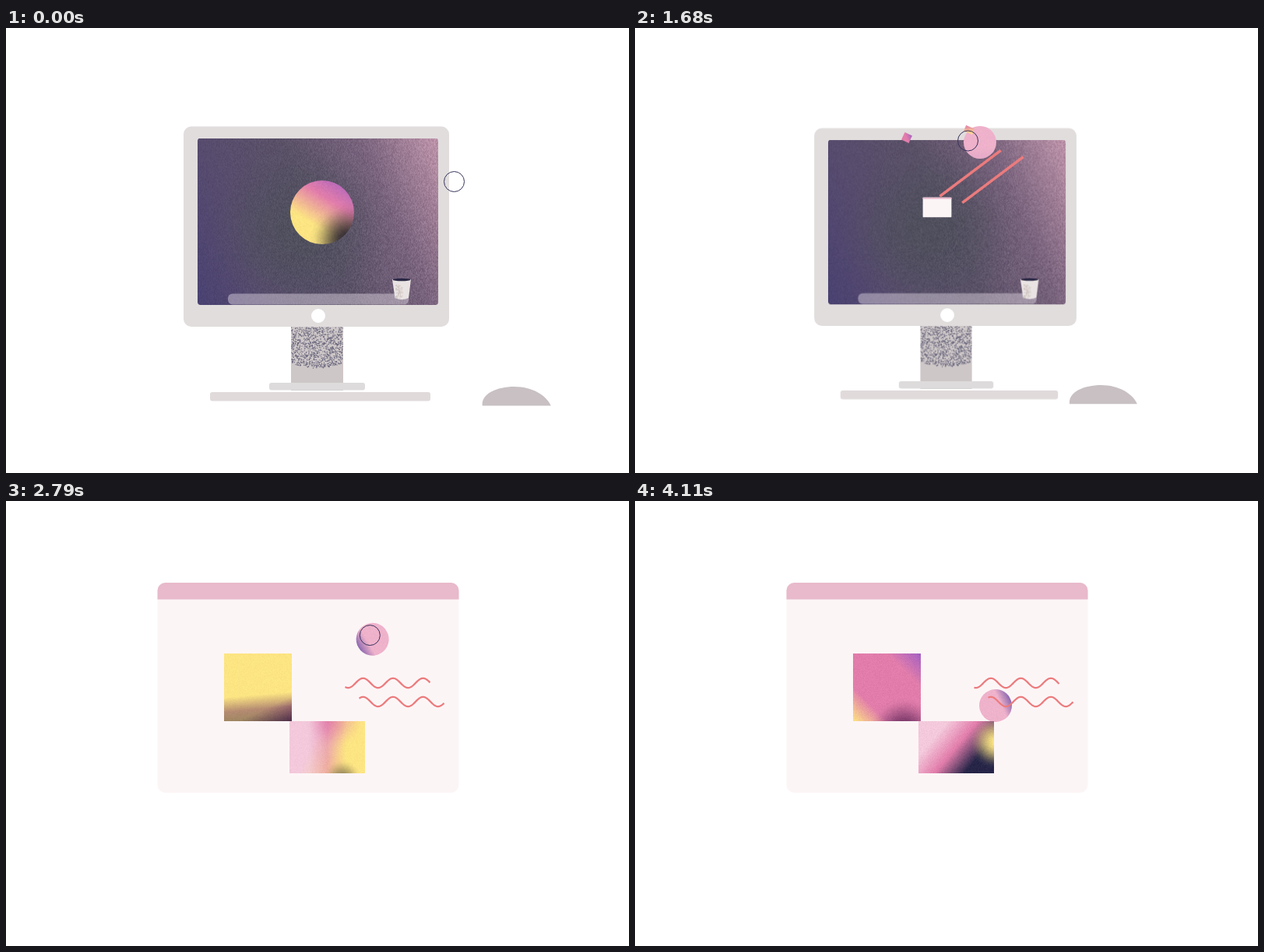
Write an HTML page with a canvas that moves like this. It is 800x572 px and loops after 4.14 s.

```html
<!DOCTYPE html>
<html lang="en">
<head>
<meta charset="utf-8">
<title>Desktop shapes</title>
<style>
  html, body { margin: 0; width: 100%; height: 100%; overflow: hidden; background: #fff; }
  canvas { display: block; }
</style>
</head>
<body>
<canvas id="stage" width="800" height="572"></canvas>
<script>
const LOOP = 4140, STEP = 30, TAU = Math.PI * 2;
const PALE = '#f3c9db', ROSE = '#efb2cb', PINK = '#e27dab', YELLOW = '#fde583',
  PURPLE = '#a25fc2', PLUM = '#6b2f60', NAVY = '#262548', INK = '#2c2630';
const ctx = document.getElementById('stage').getContext('2d');

let seed = 7;
const rand = () => (seed = (seed * 16807) % 2147483647) / 2147483647;

// ---- textures ----

function layer(w, h, draw) {
  const c = document.createElement('canvas');
  c.width = w;
  c.height = h;
  draw(c.getContext('2d', { willReadFrequently: true }));
  return c;
}

function roundRect(g, x, y, w, h, r, fill) {
  g.fillStyle = fill;
  g.beginPath();
  g.roundRect(x, y, w, h, r);
  g.fill();
}

function disc(g, x, y, r) {
  g.beginPath();
  g.arc(x, y, r, 0, TAU);
}

function sweep(g, w, h, deg, colours) {
  const a = deg * TAU / 360, c = Math.cos(a), s = Math.sin(a);
  const half = (Math.abs(w * c) + Math.abs(h * s)) / 2;
  const grad = g.createLinearGradient(w / 2 - half * c, h / 2 - half * s,
    w / 2 + half * c, h / 2 + half * s);
  colours.forEach((colour, i) => grad.addColorStop(i / (colours.length - 1), colour));
  g.fillStyle = grad;
  g.fillRect(0, 0, w, h);
}

// Soft spot; place and radius in units of the box
function spot(g, w, h, colour, x, y, r) {
  const grad = g.createRadialGradient(x * w, y * h, 0, x * w, y * h, r * w);
  for (let d = 0; d <= 1; d += .125) {
    const alpha = Math.round(255 * (1 - d * d) ** 2);
    grad.addColorStop(d, colour + alpha.toString(16).padStart(2, '0'));
  }
  g.fillStyle = grad;
  g.fillRect(0, 0, w, h);
}

function grain(g, w, h, amount) {
  const img = g.getImageData(0, 0, w, h), d = img.data;
  for (let i = 0; i < d.length; i += 4) {
    const n = (rand() - .5) * amount(i / 4 % w / w);
    for (let k = 0; k < 3; k++) d[i + k] += n;
  }
  g.putImageData(img, 0, 0);
}

const skin = (w, h, deg, colours, blot, amount = () => 10) => layer(w, h, g => {
  sweep(g, w, h, deg, colours);
  if (blot) spot(g, w, h, ...blot);
  grain(g, w, h, amount);
});

// Each skin is fully shown at its time and fades into the next
const ballSkins = [
  [0, skin(84, 84, -58, [YELLOW, YELLOW, PINK, PURPLE], [INK, .9, .95, .6])],
  [780, skin(84, 84, 70, [PURPLE, PINK, PINK, PLUM, NAVY])],
  [1600, skin(84, 84, 90, [ROSE, ROSE])],
  [2370, skin(84, 84, 90, [ROSE, ROSE, ROSE, '#8a66ae'])]
];
const squareSkins = [
  [1680, skin(87, 87, -45, [PINK, PINK, PURPLE])],
  [1920, skin(87, 87, 100, [YELLOW, YELLOW, PINK, PINK, PLUM], [INK, 0, 0, .38])],
  [2370, skin(87, 87, 85, [YELLOW, YELLOW, YELLOW, YELLOW, PLUM, INK])],
  [3210, skin(87, 87, 65, [YELLOW, YELLOW, YELLOW, YELLOW, PLUM])],
  [4110, skin(87, 87, -45, [YELLOW, PINK, PINK, PINK, PURPLE], [PLUM, .75, 1.15, .5])]
];
const cardSkins = [
  [1680, skin(97, 67, 60, [PINK, YELLOW])],
  [1920, skin(97, 67, 15, [PALE, PALE, YELLOW, YELLOW, INK], [PINK, .85, 0, .55])],
  [2370, skin(97, 67, 25, [PALE, PALE, YELLOW, YELLOW], [PINK, .6, -.05, .4])],
  [3210, skin(97, 67, 0, [PALE, PALE, PINK, YELLOW, YELLOW], [INK, .7, 1.1, .25])],
  [4110, skin(97, 67, 40, [PALE, PALE, PINK, NAVY, NAVY], [YELLOW, 1.02, .4, .35])]
];

const wallpaper = skin(309, 215, -24,
  ['#4a4272', '#584c6e', '#5b5268', '#7a647e', '#bf95ab'],
  ['#50505e', .42, .55, .4], x => 10 + 26 * x);

const computer = layer(800, 572, g => {
  // stand
  g.fillStyle = '#cec7c8';
  g.fillRect(366, 380, 67, 86);
  g.fillStyle = '#66647a';
  for (let i = 0; i < 1100; i++) {
    const x = rand() * 66, y = rand() * 53;
    if (y < 53 - (x / 33 - 1) ** 2 * 7) g.fillRect(366 + x, 384 + y, 1.1, 1.1);
  }
  roundRect(g, 338, 456, 123, 9.5, 3, '#dddbdb');
  roundRect(g, 262, 468, 283, 11.5, 3, '#e1dadb');
  // body and screen
  roundRect(g, 228, 126.5, 341, 257.5, 10, '#e1dddd');
  g.save();
  g.beginPath();
  g.roundRect(246, 141.5, 309, 214.5, 4);
  g.clip();
  g.drawImage(wallpaper, 246, 141.5);
  g.restore();
  roundRect(g, 285, 341.5, 232, 14, 6, 'rgba(226,218,228,.45)');
  // bin
  g.fillStyle = '#e9e4e3';
  g.beginPath();
  g.moveTo(496, 323);
  g.lineTo(520, 323);
  g.lineTo(517, 347);
  g.quadraticCurveTo(508, 351, 499.5, 347);
  g.fill();
  g.fillStyle = '#c9bdb8';
  for (let i = 0; i < 70; i++) g.fillRect(500 + rand() * 9, 330 + rand() * 17, 1, 1);
  g.fillStyle = '#2b2845';
  g.beginPath();
  g.ellipse(508, 323.5, 11.5, 1.8, 0, 0, TAU);
  g.fill();
  // emblem
  g.fillStyle = '#fff';
  disc(g, 401, 370, 9);
  g.fill();
});

// ---- motion ----

// Smooth step from 0 to 1 between two times
function ramp(t, from, to) {
  const u = Math.min(1, Math.max(0, (t - from) / (to - from)));
  return u * u * (3 - 2 * u);
}

// Key points: time, then x, y and sometimes turn
const cursorPath = [[0, 575.5, 197.5], [270, 585, 158], [780, 518, 97.5], [1080, 470, 88],
  [1680, 427.5, 145], [1920, 418, 195], [2370, 411, 253], [2760, 468, 172], [3210, 414.5, 217]];
const ballPath = [[0, 406, 237], [780, 409, 257], [1680, 443, 147], [1920, 473, 143],
  [2370, 480, 168], [2700, 480, 168], [3150, 390, 262], [4110, 463, 263]];
const squarePath = [[1680, 349, 141, 25], [1920, 298, 186, -24], [2370, 319.5, 242, -21.5],
  [2670, 323.5, 239.5, 0]];
const cardPath = [[1680, 429, 131, 22], [1920, 451.5, 247, 21], [2340, 412.5, 316.5, 0]];
const wavePath = [[1680, 445, 191, -37], [1920, 475.5, 206, -8], [2370, 499, 246, 0]];

// Monotone cubic through the key points
function along(path, t) {
  const end = path.length - 1;
  if (t <= path[0][0]) return path[0].slice(1);
  if (t >= path[end][0]) return path[end].slice(1);
  const i = path.findIndex(key => key[0] > t) - 1;
  const slope = (n, c) => (path[n + 1][c] - path[n][c]) / (path[n + 1][0] - path[n][0]);
  const tangent = (n, c) => {
    if (n === 0) return slope(0, c);
    if (n === end) return 0;
    const a = slope(n - 1, c), b = slope(n, c);
    return a * b <= 0 ? 0 : 2 * a * b / (a + b);
  };
  const span = path[i + 1][0] - path[i][0], u = (t - path[i][0]) / span, v = 1 - u;
  return path[i].slice(1).map((p, n) => {
    const c = n + 1;
    return v * v * (1 + 2 * u) * p + u * u * (3 - 2 * u) * path[i + 1][c]
      + span * u * v * (v * tangent(i, c) - u * tangent(i + 1, c));
  });
}

// ---- drawing ----

function paintSkin(skins, t, w, h) {
  const i = Math.max(0, skins.findLastIndex(s => s[0] <= t));
  const [from, now] = skins[i], next = skins[i + 1];
  ctx.drawImage(now, -w / 2, -h / 2, w, h);
  if (!next) return;
  ctx.globalAlpha = Math.max(0, (t - from) / (next[0] - from));
  ctx.drawImage(next[1], -w / 2, -h / 2, w, h);
  ctx.globalAlpha = 1;
}

function placed(x, y, scale, deg, draw) {
  if (scale <= 0) return;
  ctx.save();
  ctx.translate(x, y);
  ctx.rotate(deg * TAU / 360);
  ctx.scale(scale, scale);
  draw();
  ctx.restore();
}

// The mouse on the desk follows the cursor sideways
function drawDesk(t) {
  const reach = Math.max(0, (along(cursorPath, t)[0] - 427) / 149);
  const x = 604 + 52 * reach ** 1.8;
  placed(400, 300, 1 - ramp(t, 1665, 1890), 0, () => {
    ctx.translate(-400, -300);
    ctx.drawImage(computer, 0, 0);
    ctx.fillStyle = '#c8c0c2';
    ctx.beginPath();
    ctx.moveTo(x - 44, 485.5);
    ctx.bezierCurveTo(x - 46, 470, x - 25, 461, x - 3, 461);
    ctx.bezierCurveTo(x + 20, 461, x + 38, 472, x + 44, 485.5);
    ctx.fill();
  });
}

function drawPane(t) {
  const grow = ramp(t, 1620, 1935);
  const swing = Math.sin(Math.PI * Math.min(1, Math.max(0, (t - 1680) / 660)));
  placed(388, 229.5 + 10.5 * grow + 10 * swing, grow, 0, () => {
    roundRect(ctx, -193.5, -135, 387, 270, 10, '#fcf5f6');
    roundRect(ctx, -193.5, -135, 387, 21.5, [10, 10, 0, 0], '#e8bacb');
  });
}

function drawBall(t) {
  const [x, y] = along(ballPath, t), r = 41 - 20 * ramp(t, 1080, 1680);
  const turn = 45 * ramp(t, 1680, 2370) + 135 * ramp(t, 2700, 3150) + 65 * ramp(t, 3150, 4110);
  placed(x, y, 1, turn, () => {
    disc(ctx, 0, 0, r);
    ctx.clip();
    paintSkin(ballSkins, t, r * 2, r * 2);
  });
}

function drawBox(path, skins, w, h, t) {
  const [x, y, turn] = along(path, t);
  placed(x, y, ramp(t, 1600, 1970), turn, () => paintSkin(skins, t, w, h));
}

// Two straight strokes that loosen into running waves
function drawWaves(t) {
  if (t < 1590) return;
  const [x, y, turn] = along(wavePath, t);
  const loose = ramp(t, 1680, 1980);
  const half = (49 + 5.5 * loose) * ramp(t, 1560, 1680);
  const crest = 445 - .0595 * (t - 2370) - x;
  placed(x, y, 1, turn, () => {
    ctx.strokeStyle = '#ec7b7d';
    ctx.lineWidth = 3.5 - 1.3 * loose;
    for (const side of [-1, 1]) {
      ctx.beginPath();
      for (let d = -half; d <= half; d++) {
        const px = side * 9 + d;
        ctx.lineTo(px, side * 12 - 6.2 * loose * Math.cos((px - crest) / 38.5 * TAU));
      }
      ctx.stroke();
    }
  });
}

function drawCursor(t) {
  const [x, y] = along(cursorPath, t);
  ctx.globalAlpha = 1 - ramp(t, 3270, 3480);
  ctx.strokeStyle = '#35325a';
  ctx.lineWidth = 1;
  disc(ctx, x, y, 13);
  ctx.stroke();
  ctx.globalAlpha = 1;
}

function render(t) {
  ctx.fillStyle = '#fff';
  ctx.fillRect(0, 0, 800, 572);
  drawDesk(t);
  drawPane(t);
  drawBox(squarePath, squareSkins, 87, 87, t);
  drawBall(t);
  drawBox(cardPath, cardSkins, 97, 67, t);
  drawWaves(t);
  drawCursor(t);
}

const start = performance.now();
function tick() {
  const t = Math.max(0, performance.now() - start) % LOOP;
  render(Math.floor(t / STEP) * STEP);
  requestAnimationFrame(tick);
}
tick();
</script>
</body>
</html>
```
